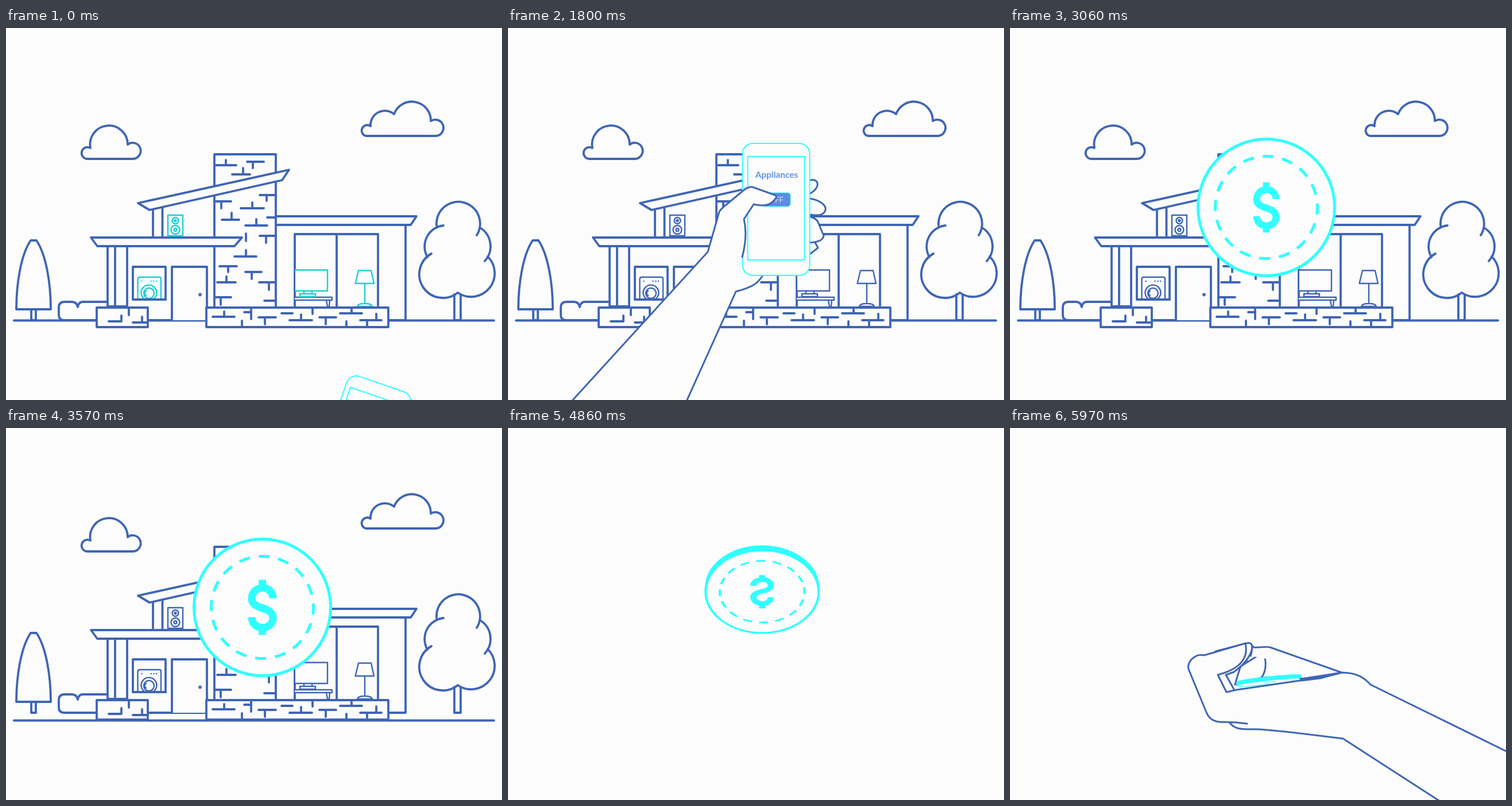
Animation, 864 px wide and 648 px high, one loop 6300 ms. Source, as an HTML page:

```html
<!DOCTYPE html>
<html lang="en">
<head>
<meta charset="utf-8">
<title>Smart home savings</title>
<style>
  html, body { margin: 0; width: 100%; height: 100%; overflow: hidden; background: #fcfcfc; }
  svg { display: block; width: 100vw; height: 100vh; }
  svg * { fill: #fcfcfc; stroke: #3f65b4; stroke-linecap: round; stroke-linejoin: round; }
  #scene, #ground { stroke-width: 3.8; }
  #scene .line, #ground, .line { fill: none; }
  #devices { stroke-width: 2.4; }
  #devices * { stroke: inherit; }
  .hand { stroke-width: 3; }
  .hand .bare { stroke: none; }
  #sliver, .solid { fill: #3f65b4; }
  #face rect, #dollar { stroke: #30ffff; }
  #dollar { fill: none; stroke-width: 13; stroke-linecap: butt; }
  #inner { fill: none; stroke-linecap: butt; }
  #rim { fill: #30ffff; stroke: #30ffff; stroke-width: 2; }
  #label * { stroke: none; font-family: Lato, sans-serif; text-anchor: middle; }
  #label .title { fill: #6394e6; font-size: 15.4px; font-weight: 700; }
  #label .off { fill: #d5e4ff; font-size: 13.5px; }
</style>
</head>
<body>
<svg viewBox="0 0 864 648">
  <path id="ground"/>
  <g id="scene">
    <!-- clouds -->
    <path d="M141 228H221A14 14 0 1 0 212 203A32.8 32.8 0 1 0 147 209A10.2 10.2 0 1 0 141 228Z"/>
    <path d="M627 188H749A14.2 14.2 0 1 0 740 162A33 33 0 0 0 676 150A25 25 0 0 0 635 171A9.6 9.6 0 1 0 627 188Z"/>
    <!-- plants -->
    <path d="M44 490V509H52V490"/>
    <path d="M18 490H78C78 445 70 395 53 370H43C26 395 18 445 18 490Z"/>
    <path class="line" d="M176 477H133Q126 478 125 486Q123 477 115 477H102Q92 477 92 487V500Q92 509 102 509H158"/>
    <path class="line" d="M750 344A38 38 0 1 1 820 361M762 344A37 37 0 0 0 734 399M826 348A38 38 0 0 1 834 406"/>
    <path class="line" d="M741 393A41.2 41.2 0 1 0 787 461A41 41 0 0 0 839 398M781 464V509H792V464"/>
    <!-- house -->
    <path class="line" d="M247 509H349M667 509H696V343M256 317V365M272.500 314V365"/>
    <rect x="363" y="220" width="107" height="267"/>
    <path class="line" d="M366 239h35m-18 -9v9M394 255h31m-12 -11v11M420 233h29m-19 0v11M442 291h28m-16 0v10M363 302h29m-17 0v12M409 314h40m-20 -10v10M376 334h30m-13 -12v12M455 330h15M417 344h38m-19 -11v11M418 358v13M442 362h28m-17 0v12M398 398h38m-18 -11v11M372 415h30m-15 0v10M417 425h28m-17 0v12M368 443h32m-16 -10v10M441 443h29m-12 0v13M363 469h29m-18 0v13M450 475h20"/>
    <path d="M230 305L493 247L481 265L250 317Z"/>
    <path d="M177 380V485H211V380M190 380V485"/>
    <path d="M148 365H411L398 380H159Z"/>
    <path d="M470 328H715L705 343H470Z"/>
    <rect x="221" y="416" width="57" height="57"/>
    <path d="M289 509V416H350V509"/>
    <circle class="solid" cx="338" cy="464.500" r="1"/>
    <path d="M503 359H648V487H503ZM576 359V487"/>
    <path style="stroke-width:2.4" d="M503 469H568V474H503M558 474L560 485H563L564 474"/>
    <g id="devices">
      <path d="M282 326H308V362H282Z"/>
      <circle cx="295" cy="335.500" r="5.500"/><circle cx="295" cy="335.500" r="1.500"/>
      <circle cx="295" cy="351.500" r="7.500"/><circle cx="295" cy="351.500" r="2.500"/>
      <path d="M229.500 472V437Q230 434 233 434H267Q270 434 270 437V472M236.500 441h.1M252.500 441h.1M257.500 441h.1M262 441h.1"/>
      <path d="M241 472A13.500 13.500 0 1 1 257 472Z"/>
      <circle cx="249" cy="462" r="9"/><path class="line" d="M244 458Q239 462 244 466"/>
      <path d="M504 421.500H560V458H504M519 458V463M533 458V463M512 463H539V468H512Z"/>
      <path d="M625 445V480M614 422.500H636L641 445H608.500ZM612 485Q613 480 625 480T638 485Z"/>
    </g>
    <path class="line" d="M221 473H278"/>
    <rect x="158" y="487" width="89" height="34"/>
    <rect x="349" y="487" width="317" height="34"/>
    <path class="line" d="M179 511h22v-10M214 488v12M221 513h26m-10 -10v10M360 503h38m-18 -9v9M415 495h12m0 -6v18M411 510v10M440 504h30m-19 0v12M480 497h19M494 509h39m-19 -10v10M534 488v10M546 504h29m-18 0v12M582 497h38m-18 -9v9M593 511v9M617 509h37m-9 -11v11M629 509v11"/>
  </g>

  <g id="holdBack" class="hand">
    <path d="M490 380L526 366L534 372L540 383L527 393L500 398"/>
    <path d="M480 340L516 326L530 330Q538 333 540 338L550 362C548 372 535 373 526 374L490 380"/>
    <path d="M456 317L505 294L526 297C545 300 560 312 550 322C545 328 535 326 516 324L478 325"/>
    <path d="M442 282L486 264L526 265C543 262 544 278 527 288L483 289L470 297"/>
    <path class="bare" d="M162 981L397 459C425 452 435 445 443 432L465 400L408 330L348 390L-187 977Z"/>
    <path class="line" d="M162 981L397 459C425 452 435 445 443 432"/>
  </g>
  <g id="catchBack" class="hand"></g>

  <g id="token">
    <path id="rim"/>
    <g id="face">
      <rect id="outer"/>
      <rect id="inner"/>
      <path id="dollar" d="M18.500 -16C18.500 -40 -18.500 -40 -18.500 -15C-18.500 5 18.500 -3 18.500 18C18.500 41 -18.500 41 -18.500 17M0 -48V-34M0 34V48"/>
      <g id="label">
        <text class="title" x="1" y="-55">Appliances</text>
        <rect id="button" x="-25" y="-29" width="50" height="24" rx="5"/>
        <text class="off" x="0" y="-12">OFF</text>
      </g>
    </g>
  </g>

  <g id="holdFront" class="hand">
    <path d="M-187 977L348 390L368 320Q372 314 380 308L410 283Q418 276 426 277L462 290Q470 292 466 297Q455 314 428 307L411 333C416 355 413 380 408 399"/>
  </g>
  <g id="catchFront" class="hand"></g>
</svg>
<script>
const $ = id => document.getElementById(id);
const set = (id, attrs) => { for (const k in attrs) $(id).setAttribute(k, attrs[k]); };
const mix = (a, b, p) => a + (b - a) * p;
const ramp = (t, a, b) => Math.min(1, Math.max(0, (t - a) / (b - a)));
const easeOut = p => 1 - (1 - p) ** 2;
const easeInOut = p => p * p * (3 - 2 * p);
const mixColor = (a, b, p) => `rgb(${a.map((v, i) => Math.round(mix(v, b[i], p)))})`;

// Two poses per part of the catching hand: open, closed
const catchParts = {
  catchBack: [
    ["M297 575L288 515C292 510 300 512 306 515L310 575",
     "M395 447L402 418C405 412 408 408 412 404L416 440"],
    ["M305 575C300 565 302 555 305 550L311 485C320 480 343 492 343 517L343 556L361 571",
     "M392 447C394 440 398 425 402 415L436 394C448 394 447 420 440 432L436 436L448 434"],
    ["M248 588L214 542C220 530 245 528 260 543L288 575L345 577",
     "M358 389L412 375C430 370 424 400 390 425L376 430L390 455"],
    ["M548 505L425 462C390 435 370 415 340 415C325 416 321 425 323 432C328 448 338 462 345 466L400 499C410 515 412 535 400 555",
     "M578 426L453 382C445 380 435 383 425 382C424 381 423 380 422 380C422 382 422 385 421 388L421 390C420 393 420 395 419 397"]
  ],
  catchFront: [
    ["M1164 672L588 518C580 510 565 503 537 507L415 548L348 577L330 585L266 595C250 590 235 582 220 577L215 575C205 573 180 580 177 597L245 632C250 637 254 638 258 638L345 632L397 626M362 631C375 640 390 636 410 632L430 629L560 619L1034 804",
     "M1164 710L628 447C618 436 605 426 578 426L505 440L395 456L377 460L362 430C385 424 418 410 410 375L338 396C325 392 308 405 311 420L342 495C347 508 358 513 372 512L395 513L413 515M383 514C395 528 410 524 437 525L480 529L580 541L1046 842"],
    ["M537 507L430 543L400 555L348 577L415 552Z",
     "M578 426L540 432L506 437L508 440L540 436Z"]
  ]
};
const morphs = [];
for (const id in catchParts) for (const [open, closed] of catchParts[id]) {
  const el = document.createElementNS("http://www.w3.org/2000/svg", "path");
  $(id).append(el);
  morphs.push({ el, open, closed: closed.match(/\d+/g) });
}
morphs.at(-1).el.id = "sliver";

function drawScene(t) {
  const lift = t < 3330 ? 0
    : t < 3960 ? 13 * Math.exp(.00765 * (t - 3570))
    : 257 * Math.exp(.01017 * (Math.min(t, 4200) - 3960));
  set("scene", { transform: `translate(0 ${-lift})` });
  const half = 418 * (1 - easeInOut(ramp(t, 3570, 3870)));
  set("ground", { d: `M${432 - half} 509.500H${432 + half}`, visibility: half ? "visible" : "hidden" });
  const off = ramp(t, 1400, 1700);
  $("devices").style.stroke = mixColor([28, 207, 211], [63, 101, 180], off);
  $("button").style.fill = mixColor([76, 120, 204], [91, 140, 226], off);
}

// Offset and tilt of the phone while it is carried in
function entry(t) {
  const rise = easeOut(ramp(t, 0, 600)), settle = easeInOut(ramp(t, 600, 960));
  return {
    x: mix(150, 0, rise),
    y: mix(mix(413, -16, rise), 0, settle),
    angle: mix(mix(19, -3, rise), 0, settle)
  };
}

function drawHoldingHand(t, { x, y, angle }) {
  const press = Math.sin(Math.PI * ramp(t, 1080, 1700));
  const leave = Math.max(0, (t - 1860) / 540) ** 2;
  const transform = `translate(${x - 8 * press - 213 * leave} ${y + 290 * leave})`
    + `rotate(${-32 * leave} 535 275)rotate(${angle} 467 316)`;
  const visibility = leave < 1.8 ? "visible" : "hidden";
  set("holdBack", { transform, visibility });
  set("holdFront", { transform, visibility });
}

function drawToken(t, { x, y, angle }, grip) {
  const p = easeInOut(ramp(t, 2580, 3060));
  const box = (id, w, h, y0, radius, weight) => set(id, {
    x: -w / 2, y: y0 - h / 2, width: w, height: h, rx: radius, "stroke-width": weight
  });
  box("outer", mix(117, 238, p), mix(230, 238, p), 0, mix(18, 119, p), mix(2, 5, p));
  box("inner", mix(99, 178, p), mix(180, 178, p), mix(-2, 0, p), 89 * p, mix(2, 5, p));
  const gap = 15.5 * p, dash = Math.PI * 178 / 16 - 15.5;
  set("inner", { "stroke-dasharray": gap ? `${dash} ${gap}` : "none", "stroke-dashoffset": 7.2 });
  set("label", { opacity: 1 - ramp(t, 2580, 2760) });
  set("dollar", { transform: `scale(${easeOut(ramp(t, 2850, 3150))})` });

  const toss = ramp(t, 4650, 5340), land = ramp(t, 5340, 5760);
  const size = mix(mix(1, .667, easeOut(toss)), .47, land);
  const tilt = mix(432.5 * easeOut(toss), 447, land) * Math.PI / 180;
  const fall = t < 4805 ? 312.5 : 240 + .00113 * (t - 5060) ** 2;
  const cx = mix(467, 446.5, p) + x + mix(-12.5 * toss, 5.5, grip);
  const cy = t < 4650 ? mix(316, 312.5, p) + y : Math.min(fall, mix(508, 443, grip));
  set("token", { transform: `translate(${cx} ${cy})rotate(${angle - 6 * grip})` });

  const flat = Math.cos(tilt), r = 119 * size, ry = r * Math.abs(flat);
  const depth = 14 * size * Math.abs(Math.sin(tilt));
  const side = Math.sign(Math.sin(tilt) * flat) || 1;
  set("face", { transform: `scale(${size} ${size * flat})` });
  set("rim", {
    d: `M${-r} ${-depth}A${r} ${ry} 0 0 1 ${r} ${-depth}V0A${r} ${ry} 0 0 1 ${-r} 0Z`,
    transform: `scale(1 ${side})`,
    visibility: t > 4650 ? "visible" : "hidden"
  });
}

function drawCatchingHand(t, grip) {
  const away = 700 * (1 - ramp(t, 4900, 5340)) ** 1.32;
  const transform = `translate(${away} ${away * .27})`;
  set("catchBack", { transform });
  set("catchFront", { transform });
  for (const { el, open, closed } of morphs) {
    let i = 0;
    el.setAttribute("d", open.replace(/\d+/g, n => mix(+n, +closed[i++], grip).toFixed(1)));
  }
}

const start = performance.now();
function draw() {
  const elapsed = (performance.now() - start) % 6300;
  const t = Math.min(5970, Math.floor(elapsed / 30) * 30);
  const pose = entry(t), grip = easeInOut(ramp(t, 5490, 5970));
  drawScene(t);
  drawHoldingHand(t, pose);
  drawToken(t, pose, grip);
  drawCatchingHand(t, grip);
  requestAnimationFrame(draw);
}
draw();
</script>
</body>
</html>
```
